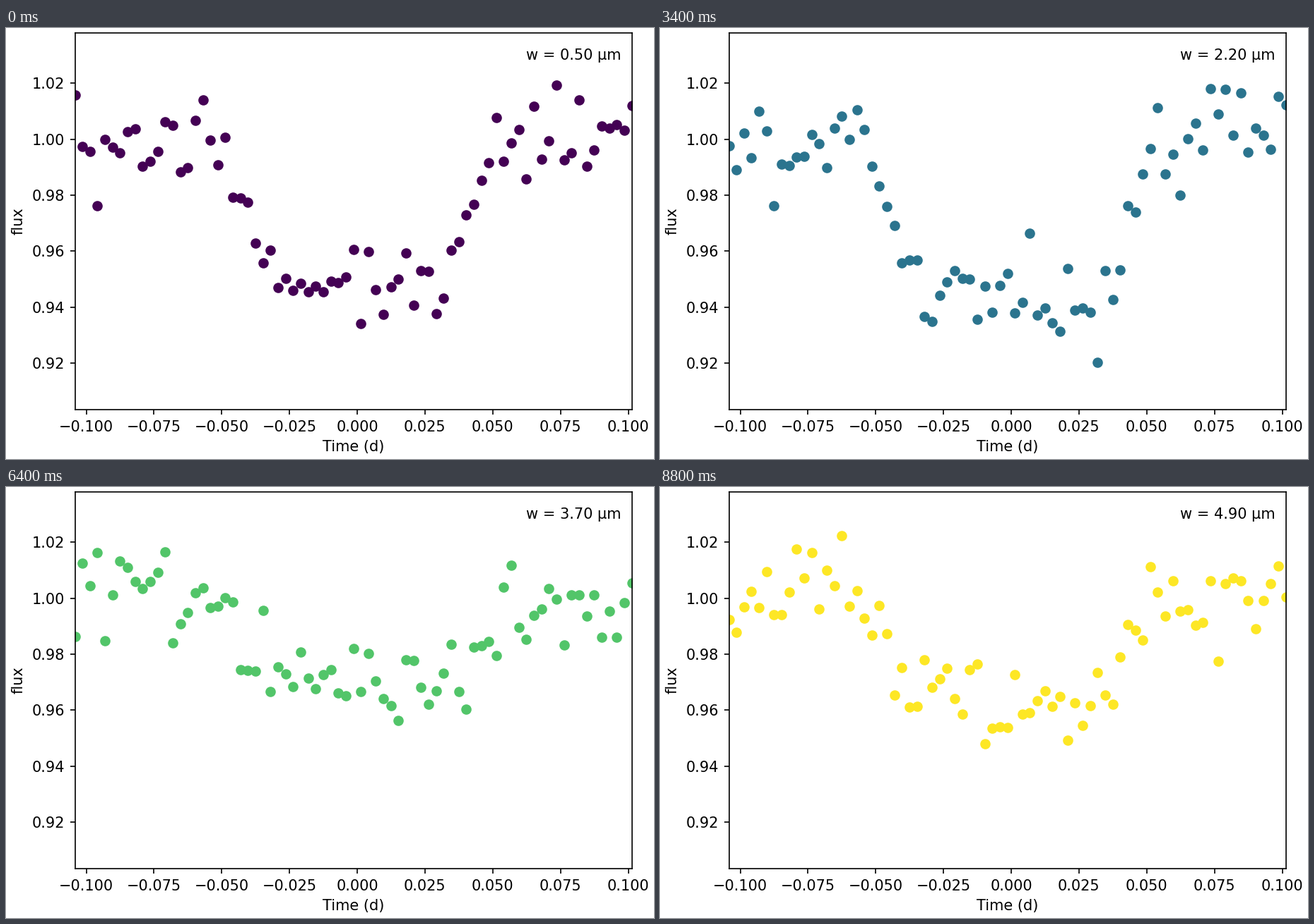
Animation of 917 by 611 pixels, one loop 9000 ms. Source, as a matplotlib script:

```python
import numpy as np
import matplotlib.pyplot as plt
from matplotlib.animation import FuncAnimation

W, H, DPI = 917, 611, 150
FRAMES, STEP_MS = 45, 200
LEFT, RIGHT, TOP, BOTTOM = 97.5, 885.5, 7, 541

plt.rcParams["font.family"] = "DejaVu Sans"
plt.rcParams["font.size"] = 10

T_MIN, T_MAX = -0.1042, 0.1013
HALF_WIDTH, INGRESS = 0.055, 0.019
SIGMA = 0.009
time = np.linspace(T_MIN, T_MAX, 75)

# One row of measurement noise per frame, fixed for every loop.
np.random.seed(11)
noise = np.clip(np.random.normal(0, SIGMA, (FRAMES, time.size)), -0.028, 0.033)


def depth(w):
    """Mid-transit depth at wavelength w."""
    return np.interp(w, [0.5, 0.9, 1.2, 1.7, 2.2, 2.6, 3.3, 4.1, 4.9],
                     [0.052, 0.061, 0.065, 0.066, 0.056, 0.045, 0.026, 0.030, 0.041])


def transit(w):
    """Noise-free light curve: smooth ingress times limb darkening."""
    cover = np.clip((HALF_WIDTH - np.abs(time)) / INGRESS, 0, 1)
    cover = cover**2 * (3 - 2 * cover)
    mu = np.sqrt(np.clip(1 - (time / HALF_WIDTH) ** 2, 0, 1))
    limb = 0.1 + 0.5 * np.exp(-(w - 0.5))
    return 1 - depth(w) * cover * (1 - limb * (1 - mu))


# The tiny offset keeps the pixel size from rounding down.
fig = plt.figure(figsize=((W + 1e-6) / DPI, (H + 1e-6) / DPI), dpi=DPI,
                 facecolor="white")
ax = fig.add_axes([LEFT / W, 1 - BOTTOM / H, (RIGHT - LEFT) / W, (BOTTOM - TOP) / H])
ax.set_xticks(np.linspace(-0.1, 0.1, 9))
ax.set_yticks(np.linspace(0.92, 1.02, 6))
ax.set_xlim(T_MIN, T_MAX)
ax.set_ylim(0.90335, 1.03803)
ax.set_xlabel("Time (d)")
ax.set_ylabel("flux")

dots, = ax.plot(time, np.ones_like(time), "o")
label = ax.text(0.981, 0.929, "", transform=ax.transAxes, ha="right", va="baseline")


def draw(i):
    w = 0.5 + 0.1 * i
    dots.set_ydata(transit(w) + noise[i])
    dots.set_color(plt.cm.viridis(i / (FRAMES - 1)))
    label.set_text(f"w = {w:.2f} µm")
    return dots, label


anim = FuncAnimation(fig, draw, frames=FRAMES, interval=STEP_MS,
                     init_func=lambda: draw(0), repeat=True, repeat_delay=0)
plt.show()
```
